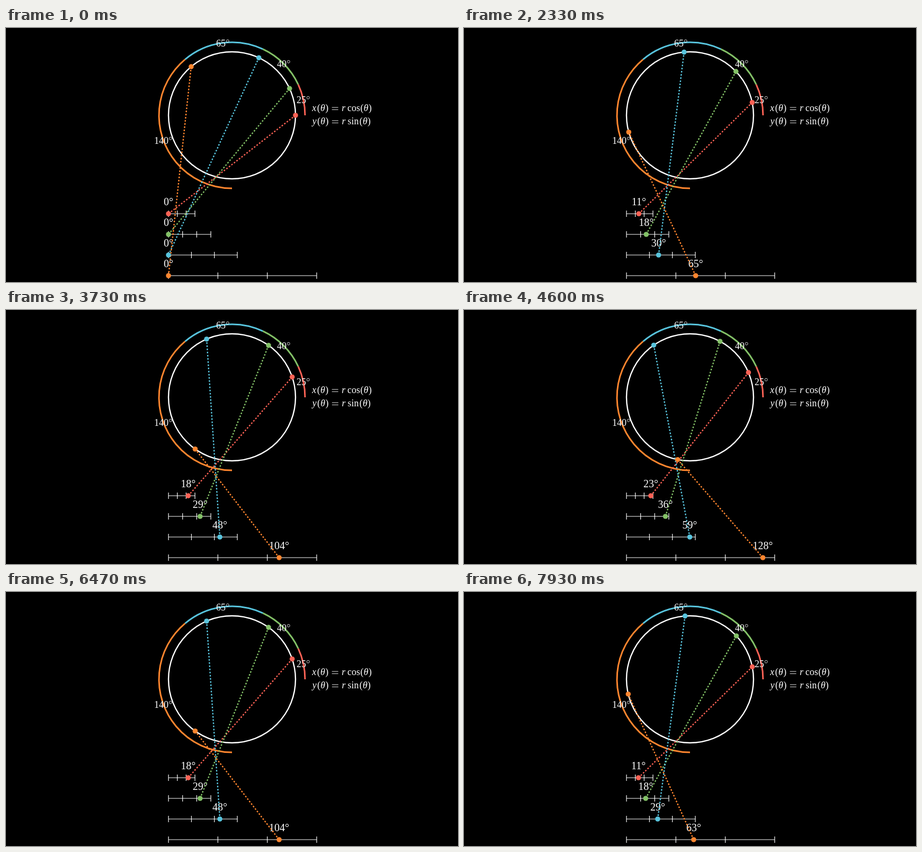
These frames come from a looping animation (854 px wide and 480 px high, 8000 ms). An HTML page with a canvas:

```html
<!DOCTYPE html>
<html lang="en">
<head>
<meta charset="utf-8">
<title>Arc lengths on a circle</title>
<style>
html, body { margin: 0; width: 100%; height: 100%; overflow: hidden; background: #000; }
canvas { display: block; width: 854px; height: 480px; }
</style>
</head>
<body>
<canvas id="stage" width="854" height="480"></canvas>
<script>
const ctx = document.getElementById('stage').getContext('2d');
const LOOP = 8000, FPS = 15, STEPS = 75, HOLD = 3;
const CX = 427, CY = 165, R = 120, OUTER = 138, BAR_X = 307;
const SERIF = '"Liberation Serif", serif';
const WHITE = '#fff';

// start and span in degrees, bar height, centre of the span label
const arcs = [
  { from: 0, span: 25, color: '#fc6255', y: 351, label: [561.5, 136] },
  { from: 25, span: 40, color: '#83c167', y: 390, label: [524.5, 68] },
  { from: 65, span: 65, color: '#58c4dd', y: 429, label: [409.5, 29] },
  { from: 130, span: 140, color: '#ff862f', y: 468, label: [297, 213] }
];

const rad = deg => deg * Math.PI / 180;

function onCircle(deg, r) {
  return [CX + r * Math.cos(rad(deg)), CY - r * Math.sin(rad(deg))];
}

function strokeArc(x, y, r, from, to, color, width) {
  ctx.beginPath();
  ctx.arc(x, y, r, -rad(from), -rad(to), true);
  ctx.strokeStyle = color;
  ctx.lineWidth = width;
  ctx.stroke();
}

function line(x1, y1, x2, y2, color, width) {
  ctx.beginPath();
  ctx.moveTo(x1, y1);
  ctx.lineTo(x2, y2);
  ctx.strokeStyle = color;
  ctx.lineWidth = width;
  ctx.stroke();
}

// Half dashes, half gaps, beginning and ending on a dash
function dashed(a, b, color) {
  const length = Math.hypot(b[0] - a[0], b[1] - a[1]);
  const n = Math.ceil(length / 6);
  ctx.setLineDash([length / 2 / n, length / 2 / (n - 1)]);
  line(...a, ...b, color, 2.4);
  ctx.setLineDash([]);
}

function dot([x, y], color) {
  ctx.beginPath();
  ctx.arc(x, y, 4.8, 0, 2 * Math.PI);
  ctx.fillStyle = color;
  ctx.fill();
}

function text(str, x, y, size, style = '') {
  ctx.font = `${style} ${size}px ${SERIF}`;
  ctx.textAlign = 'center';
  ctx.fillStyle = WHITE;
  ctx.fillText(str, x, y);
}

function spanLabel({ span, label: [x, y] }) {
  text(String(span), x - 3.5, y + 6, 18);
  const half = String(span).length * 4.5 + 3.5;
  strokeArc(x + half - 3.2, y - 4.3, 2.5, 0, 360, WHITE, 0.8);
}

// Each token is [text, advance in em, font style]
function formula(variable, advance, fn, fnAdvance, x, y) {
  const size = 18;
  const argument = [['(', 0.389], ['θ', 0.469, 'italic'], [')', 0.389]];
  const tokens = [
    [variable, advance, 'italic'], ...argument,
    ['', 0.278], ['=', 0.778], ['', 0.278],
    ['r', 0.451, 'italic'], ['', 0.167],
    [fn, fnAdvance], ...argument
  ];
  for (const [str, em, style] of tokens) {
    const width = em * size;
    if (str === '=') {
      for (const dy of [-6.6, -2.4]) line(x + 1, y + dy, x + width - 1, y + dy, WHITE, 0.9);
    } else if (str) {
      text(str, x + width / 2, y, size, style);
    }
    x += width;
  }
}

function bar({ span, y }) {
  const length = span * 2;
  line(BAR_X, y, BAR_X + length, y, WHITE, 1.2);
  for (let i = 0; i <= 3; i++) {
    const x = BAR_X + length * i / 3;
    line(x, y - 6, x, y + 6, WHITE, 1.2);
  }
}

// Up, a short hold, then back down
function stepAt(ms) {
  const t = Math.floor(ms % LOOP / 10) * 10 + 5;
  const k = Math.floor(t * FPS / 1000);
  return Math.min(k, STEPS, 2 * STEPS + HOLD - k);
}

function draw(ms) {
  const step = stepAt(ms);
  ctx.fillStyle = '#000';
  ctx.fillRect(0, 0, 854, 480);

  strokeArc(CX, CY, R, 0, 360, WHITE, 2.4);
  for (const a of arcs) strokeArc(CX, CY, OUTER, a.from, a.from + a.span, a.color, 3);
  arcs.forEach(spanLabel);
  formula('x', 0.571, 'cos', 1.338, 577, 156.7);
  formula('y', 0.526, 'sin', 1.228, 578, 181.7);
  arcs.forEach(bar);

  const movers = arcs.map(a => {
    const turned = a.span * step / STEPS;
    return { ...a, turned, rim: onCircle(a.from + turned, R), foot: [BAR_X + 2 * turned, a.y] };
  });
  for (const m of movers) text(Math.floor(m.turned) + '°', m.foot[0], m.y - 16.2, 20);
  for (const m of movers) dashed(m.rim, m.foot, m.color);
  for (const m of movers) {
    dot(m.rim, m.color);
    dot(m.foot, m.color);
  }
}

const start = performance.now();
function tick() {
  draw(performance.now() - start);
  requestAnimationFrame(tick);
}
tick();
</script>
</body>
</html>
```
